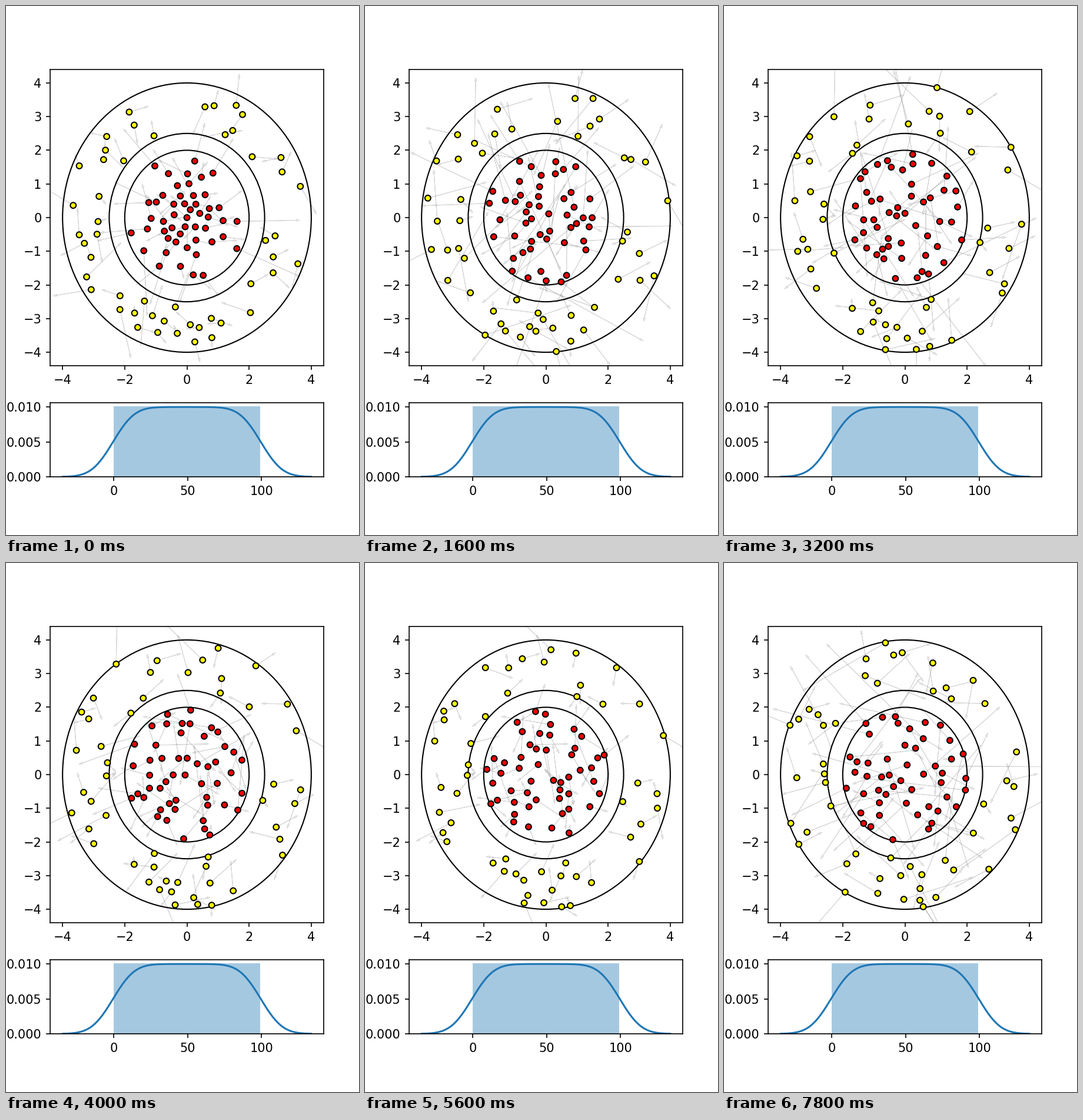
A matplotlib script for the animation above (8 s loop, 600 by 900 pixels).

```python
import numpy as np
import matplotlib.pyplot as plt
from matplotlib.animation import FuncAnimation
from matplotlib.collections import PolyCollection

FRAMES, INTERVAL = 40, 200
R_INNER, R_GAP, R_OUTER = 2.0, 2.5, 4.0
COUNT = 50           # balls in each region
BALL = 0.22          # contact distance of two balls
SUBSTEPS = 4
ARROW_GAIN = 20      # arrow length per unit of movement in one frame

rng = np.random.default_rng(7)


def place(sample, spacing):
    """Draw points one by one, keeping only those clear of the others."""
    points = []
    while len(points) < COUNT:
        p = sample()
        if all(np.hypot(*(p - q)) > spacing for q in points):
            points.append(p)
    return np.array(points)


def core_point():
    """Dense middle that thins out towards the inner wall."""
    r = min(abs(rng.normal(0, 0.85)), 1.85)
    a = rng.uniform(0, 2 * np.pi)
    return r * np.array([np.cos(a), np.sin(a)])


def ring_point():
    r = rng.uniform(R_GAP + 0.1, R_OUTER - 0.15)
    a = rng.uniform(0, 2 * np.pi)
    return r * np.array([np.cos(a), np.sin(a)])


def pace(frame):
    """Heating and cooling: common speed factor with a 6 s period."""
    t = frame * INTERVAL / 1000
    return np.exp(-0.48 * np.cos(2 * np.pi * (t - 5.3) / 6)) / 8.2


def bounce_walls(pos, vel, low, high):
    r = np.hypot(*pos.T)
    normal = pos / np.maximum(r, 1e-9)[:, None]
    radial = (vel * normal).sum(1)
    hit = ((r > high) & (radial > 0)) | ((r < low) & (radial < 0))
    vel[hit] -= 2 * radial[hit, None] * normal[hit]
    pos[hit] = normal[hit] * np.clip(r, low, high)[hit, None]


def bounce_balls(pos, vel):
    gap = pos[:, None] - pos[None]
    near = np.triu(np.hypot(gap[..., 0], gap[..., 1]) < BALL, 1)
    for i, j in np.argwhere(near):
        d = pos[i] - pos[j]
        n = d / max(np.hypot(*d), 1e-9)
        closing = (vel[i] - vel[j]) @ n
        if closing < 0:
            vel[i] -= closing * n
            vel[j] += closing * n


def simulate():
    inner = place(core_point, 0.24)
    outer = place(ring_point, 0.26)
    spread = rng.normal(0, 0.33, inner.shape)
    drift = rng.normal(0, 0.28, outer.shape)
    spread += 0.3 * inner - spread.mean(0)
    drift -= drift.mean(0)
    pos, vel = np.vstack([inner, outer]), np.vstack([spread, drift])
    low = np.repeat([0, R_GAP], COUNT)
    high = np.repeat([R_INNER, R_OUTER], COUNT)
    states = []
    for frame in range(FRAMES):
        states.append((pos.copy(), vel * pace(frame)))
        for _ in range(SUBSTEPS):
            pos += vel * pace(frame + 0.5) / SUBSTEPS
            bounce_balls(pos, vel)
            bounce_walls(pos, vel, low, high)
    return states


def arrow_shapes(pos, vel):
    """Thin arrows with a slim head of fixed pixel size."""
    px = np.array([465, 504]) / 8.8
    shaft = vel * ARROW_GAIN * px
    unit = shaft / np.maximum(np.hypot(*shaft.T), 1e-9)[:, None]
    side = 1.7 * unit[:, ::-1] * [-1, 1]
    start = pos * px
    base = start + shaft
    tip = base + 6 * unit
    outline = [start, base, base + side, tip, base - side, base]
    return np.stack(outline, axis=1) / px


states = simulate()

fig, (ax, ax_hist) = plt.subplots(
    2, 1, figsize=(4, 6), dpi=150,
    gridspec_kw={"height_ratios": [4, 1], "hspace": 0.2})

for radius in (R_INNER, R_GAP, R_OUTER):
    ax.add_patch(plt.Circle((0, 0), radius, fill=False, lw=1, zorder=2))
arrows = PolyCollection(arrow_shapes(*states[0]), lw=0.5, zorder=1,
                        facecolor=(0.83, 0.83, 0.83, 0.25),
                        edgecolor=(0.5, 0.5, 0.5, 0.3))
ax.add_collection(arrows)
balls = ax.scatter(*states[0][0].T, s=22, c=["red"] * COUNT + ["yellow"] * COUNT,
                   edgecolors="black", linewidths=1, zorder=3)
ax.set(xlim=(-4.4, 4.4), ylim=(-4.4, 4.4),
       xticks=range(-4, 5, 2), yticks=range(-4, 5))

# Density of 0..99 with a Gaussian kernel estimate
data = np.arange(100)
width = data.std(ddof=1) * len(data) ** -0.2
x = np.linspace(-3 * width, 99 + 3 * width, 200)
kernel = np.exp(-0.5 * ((x[:, None] - data) / width) ** 2)
density = kernel.mean(1) / (width * np.sqrt(2 * np.pi))
ax_hist.bar(0, 1 / 99, width=99, align="edge", color="C0", alpha=0.4, lw=0)
ax_hist.plot(x, density, color="C0", lw=1.5)
margin = 0.05 * (x[-1] - x[0])
ax_hist.set(xlim=(x[0] - margin, x[-1] + margin), ylim=(0, 1.05 / 99),
            xticks=[0, 50, 100], yticks=[0, 0.005, 0.01])


def draw(frame):
    pos, vel = states[frame]
    balls.set_offsets(pos)
    arrows.set_verts(arrow_shapes(pos, vel))
    return balls, arrows


anim = FuncAnimation(fig, draw, frames=FRAMES, interval=INTERVAL,
                     init_func=lambda: draw(0), repeat=True)
plt.show()
```
